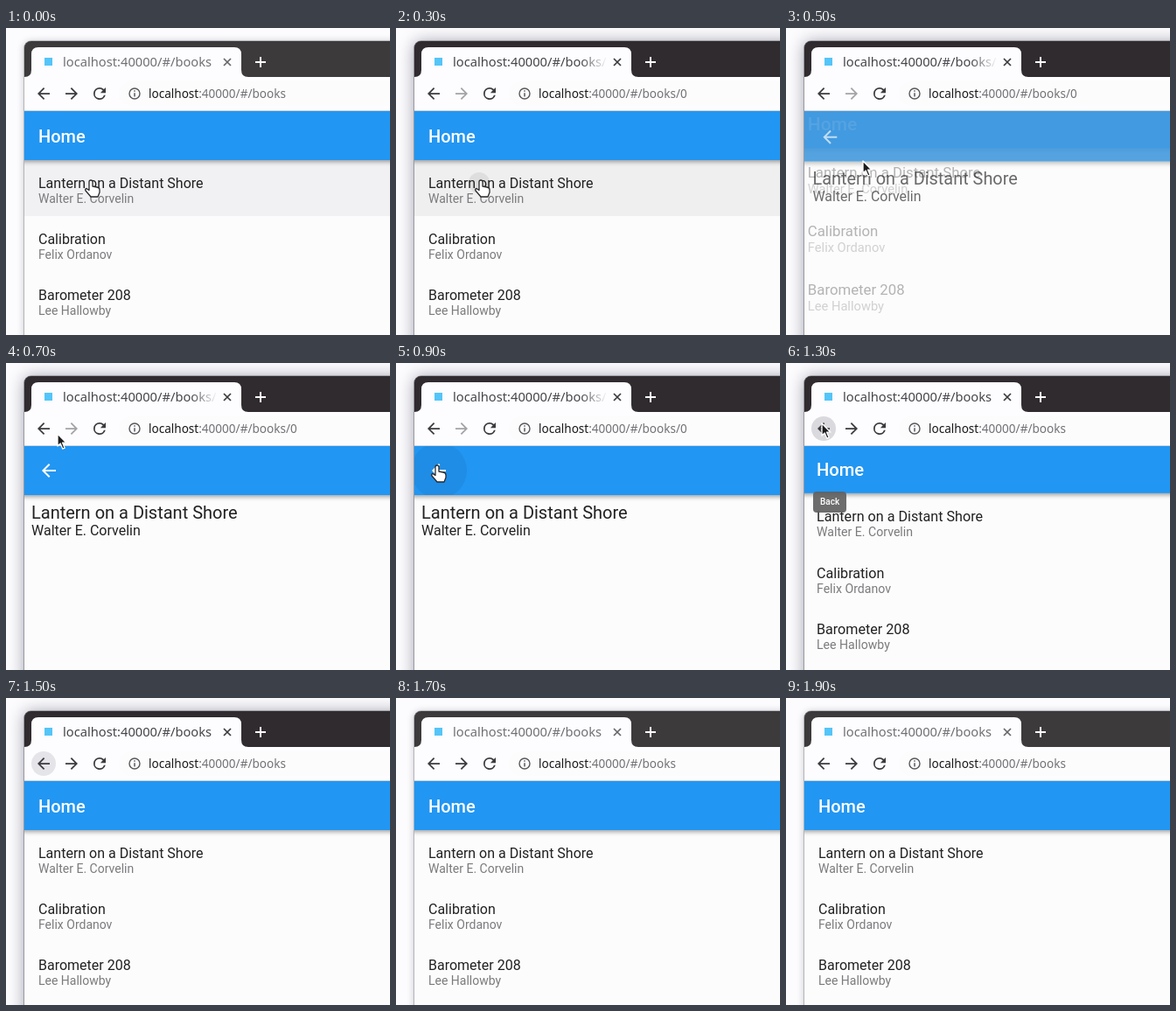
An HTML page with a canvas that plays this animation: 439 px wide and 351 px high, repeating every 2 s.

```html
<!DOCTYPE html>
<html lang="en">
<head>
<meta charset="utf-8">
<title>Book list navigation</title>
<style>
html, body { margin: 0; width: 100%; height: 100%; overflow: hidden; background: #fcfcfe; }
canvas { display: block; width: 439px; height: 351px; }
</style>
</head>
<body>
<canvas id="stage" width="439" height="351"></canvas>
<script>
const ctx = document.getElementById('stage').getContext('2d');
const W = 439, H = 351, LOOP = 2000, STEP = 100;
const LEFT = 21, TOP = 15, TOOLS = 56, BAR = 95, BODY = 151, ROW = 64;
const UI = '"Noto Sans", "Open Sans", sans-serif';
const APP = 'Roboto, sans-serif';
const PAPER = '#fcfcfd', BLUE = '#2196f3', INK = '#212121';

const books = [
  ['Lantern on a Distant Shore', 'Walter E. Corvelin'],
  ['Calibration', 'Felix Ordanov'],
  ['Barometer 208', 'Lee Hallowby']
];

const arrowIcon = new Path2D('M20 11H7.83l5.59-5.59L12 4l-8 8 8 8 1.41-1.41L7.83 13H20z');
const reloadIcon = new Path2D('M17.65 6.35A7.96 7.96 0 0 0 12 4a8 8 0 1 0 7.73 10h-2.08A6 6 0 1 1 12 6c1.66 0 3.14.69 4.22 1.78L13 11h7V4z');
const handShape = new Path2D('M-2 1q0-2 2-2t2 2v5l5 1q3 .6 3 3v3l-2 5h-8l-6-7q-1-2 1-2.5l3 2z');
const arrowShape = new Path2D('M0 0V14l3.2-3 2.6 6.2 2.4-1-2.6-6h4.4z');
// Tab outline with flared feet
const tabShape = new Path2D('M21 56q8 0 8-8V30q0-8 8-8H261q8 0 8 8V48q0 8 8 8z');

// Pointer stops: time, x, y
const stops = [
  [400, 97, 175], [500, 88, 152], [600, 74, 116], [700, 59, 81],
  [800, 52, 104], [900, 47, 118], [1000, 44, 90], [1100, 41, 69]
];

const between = (t, a, b) => t >= a && t < b;
const clamp = v => Math.max(0, Math.min(1, v));
const ease = p => 1 - (1 - p) ** 3;

function rect(x, y, w, h, fill, r = 0) {
  ctx.fillStyle = fill;
  ctx.beginPath();
  ctx.roundRect(x, y, w, h, r);
  ctx.fill();
}

function disc(x, y, r, fill) {
  ctx.fillStyle = fill;
  ctx.beginPath();
  ctx.arc(x, y, r, 0, Math.PI * 2);
  ctx.fill();
}

function lines(color, width, ...segments) {
  ctx.strokeStyle = color;
  ctx.lineWidth = width;
  ctx.beginPath();
  for (const [x1, y1, x2, y2] of segments) {
    ctx.moveTo(x1, y1);
    ctx.lineTo(x2, y2);
  }
  ctx.stroke();
}

function label(str, x, y, font, fill) {
  ctx.font = font;
  ctx.fillStyle = fill;
  ctx.fillText(str, x, y);
}

function icon(path, x, y, size, fill, flip = 1) {
  ctx.save();
  ctx.translate(x, y);
  ctx.scale(size / 24 * flip, size / 24);
  ctx.translate(-12, -12);
  ctx.fillStyle = fill;
  ctx.fill(path);
  ctx.restore();
}

function clipped(x, y, w, h, draw) {
  ctx.save();
  ctx.beginPath();
  ctx.rect(x, y, w, h);
  ctx.clip();
  draw();
  ctx.restore();
}

function zoomed(scale, alpha, draw) {
  ctx.save();
  ctx.globalAlpha = alpha;
  ctx.translate(290, 430);
  ctx.scale(scale, scale);
  ctx.translate(-290, -430);
  draw();
  ctx.restore();
}

function appBar() {
  ctx.save();
  ctx.shadowColor = 'rgba(0,0,0,.38)';
  ctx.shadowBlur = 5;
  ctx.shadowOffsetY = 2;
  rect(-50, 60, 700, BODY - 60, BLUE);
  ctx.restore();
}

function listPage(t) {
  rect(-50, 60, 700, 800, PAPER);
  if (t < 500) {
    const pressed = t >= 200;
    rect(LEFT, BODY, W, ROW, pressed ? '#efeff0' : '#f1f0f3');
    if (pressed) clipped(LEFT, BODY, W, ROW, () =>
      disc(95, 177, 6 + (t - 200) * .06, 'rgba(0,0,0,.07)'));
  }
  appBar();
  label('Home', 37, 131, `500 20px ${APP}`, '#fff');
  books.forEach(([title, author], i) => {
    const y = BODY + i * ROW;
    label(title, 37, y + 32, `16px ${APP}`, INK);
    label(author, 37, y + 49, `14px ${APP}`, '#7b7b7d');
  });
}

function detailPage(t) {
  rect(-50, 60, 700, 800, PAPER);
  appBar();
  if (t >= 900) clipped(LEFT, BAR, W, BODY - BAR, () =>
    disc(49, 123, 32, 'rgba(0,0,0,.06)'));
  icon(arrowIcon, 49, 123, 24, '#fff');
  label(books[0][0], 29, 178, `20px ${APP}`, INK);
  label(books[0][1], 29, 197, `16px ${APP}`, INK);
}

function page(t) {
  const push = clamp((t - 300) / 300);
  const pop = clamp((t - 1100) / 200);
  if (push < 1) {
    zoomed(1 + .05 * ease(push), 1, () => listPage(t));
    if (push > 0) zoomed(.85 + .15 * ease(push), push, () => detailPage(t));
  } else if (pop === 0) {
    detailPage(t);
  } else {
    const scale = t < 1300 ? 1.03 : t < 1400 ? 1.008 : 1;
    zoomed(scale, 1, () => listPage(t));
    if (pop < 1) zoomed(.95, .4, () => detailPage(t));
  }
}

function tooltip(t) {
  if (!between(t, 1000, 1400)) return;
  rect(31, 147, 38, 24, 'rgba(97,97,97,.92)', 4);
  label('Back', 39, 162, `500 10px ${APP}`, '#fff');
}

function tabStrip(active, url, opened) {
  const ink = active ? '#45454a' : '#706f73';
  const paper = '#fdfcfe';
  rect(LEFT, TOP, W, 60, active ? '#302b2f' : '#3d3a3c', [8, 0, 0, 0]);
  ctx.fillStyle = paper;
  ctx.fill(tabShape);
  rect(LEFT, TOOLS, W, BAR - TOOLS, paper);
  rect(LEFT, BAR - 1, W, 1, '#d5d5d9');
  rect(44, 34, 9, 9, '#54c5f8');
  const fade = ctx.createLinearGradient(212, 0, 242, 0);
  fade.addColorStop(0, ink);
  fade.addColorStop(1, 'rgba(90,90,95,0)');
  clipped(65, 24, 176, 30, () => label(url, 65, 44, `14.7px ${UI}`, opened ? fade : ink));
  lines(active ? '#3a3a3d' : '#66656a', 1.7, [249, 35, 257, 43], [257, 35, 249, 43]);
  lines('#fff', 2, [285, 39, 297, 39], [291, 33, 291, 45]);
}

function toolbar(t, url, canForward) {
  const dark = '#3b3b3f';
  if (between(t, 1000, 1700)) disc(43, 75, 14, t < 1400 ? '#dadade' : '#e5e5e9');
  icon(arrowIcon, 43, 75, 21, dark);
  icon(arrowIcon, 75, 75, 21, canForward ? dark : '#a3a3a6', -1);
  icon(reloadIcon, 107, 75, 21, dark);
  rect(129, 61, W, 28, '#fcfcfd', 14);
  ctx.strokeStyle = '#58585c';
  ctx.lineWidth = 1.4;
  ctx.beginPath();
  ctx.arc(147, 75, 6, 0, Math.PI * 2);
  ctx.stroke();
  lines('#58585c', 1.5, [147, 74.2, 147, 78.5], [147, 71.3, 147, 72.8]);
  const host = 'localhost', font = `13.55px ${UI}`;
  label(host, 163, 80, font, '#18181a');
  const width = ctx.measureText(host).width;
  label(url.slice(host.length), 163 + width, 80, font, '#727276');
}

function pointer(t) {
  if (t >= 1500) return;
  const [, x, y] = stops.findLast(s => s[0] <= t) || stops[0];
  const hand = t < 500 || between(t, 800, 1000);
  ctx.save();
  ctx.translate(x, y);
  ctx.lineJoin = 'round';
  ctx.lineWidth = 1.3;
  ctx.strokeStyle = hand ? '#29292c' : '#fff';
  ctx.fillStyle = hand ? '#fff' : '#1c1c1e';
  const shape = hand ? handShape : arrowShape;
  ctx.fill(shape);
  ctx.stroke(shape);
  ctx.restore();
}

function windowShadow(active) {
  ctx.save();
  ctx.shadowColor = active ? 'rgba(20,20,50,.42)' : 'rgba(20,20,50,.28)';
  ctx.shadowBlur = active ? 18 : 9;
  ctx.shadowOffsetY = 1;
  rect(LEFT, TOP, W + 60, H + 60, '#444', [8, 0, 0, 0]);
  ctx.restore();
  rect(LEFT - .6, TOP - .4, W, H, active ? '#77777c' : '#98989c', [8, 0, 0, 0]);
}

function draw(t) {
  const active = between(t, 200, 1700);
  const opened = between(t, 300, 1200);
  const url = 'localhost:40000/#/books' + (opened ? '/0' : '');
  rect(0, 0, W, H, '#fcfcfe');
  windowShadow(active);
  tabStrip(active, url, opened);
  toolbar(t, url, !opened);
  clipped(LEFT, BAR, W, H, () => {
    page(t);
    tooltip(t);
  });
  pointer(t);
}

const start = performance.now();
function tick() {
  const t = (performance.now() - start) % LOOP;
  draw(Math.floor(t / STEP) * STEP);
  requestAnimationFrame(tick);
}
tick();
</script>
</body>
</html>
```
